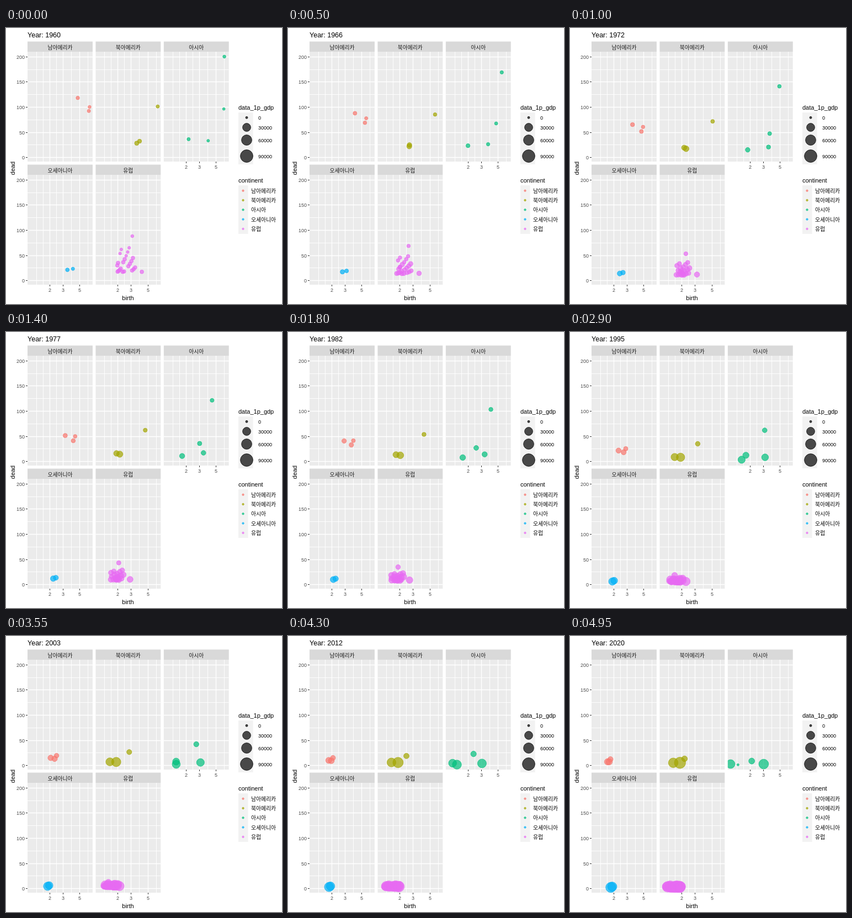
Recreate the animation shown at these times as an HTML page with a canvas. Size 500 by 500 pixels, loop 5 s.

```html
<!DOCTYPE html>
<html lang="ko">
<head>
<meta charset="utf-8">
<style>
html, body { margin: 0; width: 100%; height: 100%; overflow: hidden; background: #fff; }
canvas { display: block; width: 500px; height: 500px; }
</style>
</head>
<body>
<canvas id="stage" width="500" height="500"></canvas>
<script>
const ctx = document.getElementById('stage').getContext('2d');
const LOOP = 5000, STEP = 50, LAST = 99, YEARS = 60;
const SANS = '"Liberation Sans", Arial, sans-serif';
const HANGUL = '"Noto Sans CJK KR", "Noto Sans CJK", "Noto Sans CJK JP", sans-serif';
const PANEL_W = 117.9, PANEL_H = 199, STRIP_H = 18.5;

const lerp = (a, b, t) => a + (b - a) * t;

// Falls from 1 to 0 while t runs from 0 to 1; a higher pace falls earlier.
const decay = (t, pace) => (Math.exp(-pace * t) - Math.exp(-pace)) / (1 - Math.exp(-pace));

// birth, dead and size are [first year, last year]; pace is [birth, dead].
const country = (birth, dead, size, pace) => ({ birth, dead, size, pace });

const southAmerica = [
  country([4.7, 1.65], [118, 7], [3.2, 5.8], [.8, 3]),
  country([6.75, 1.8], [100, 12], [2.8, 4.8], [.5, 2.7]),
  country([6.6, 1.73], [92, 7], [3, 5.8], [.7, 3])
];
const northAmerica = [
  country([6.75, 2.16], [101, 13], [3, 5.2], [.5, 1.5]),
  country([3.87, 1.53], [32, 5], [3.7, 8.7], [5, 3]),
  country([3.55, 1.88], [28, 5], [3.9, 10.2], [6, 3])
];
const japan = country([2.16, 1.38], [36, 1], [3, 9], [1.5, 4.5]);
const asia = [
  country([6.45, 2.1], [200, 8.5], [2.8, 5.4], [.5, 1.2]),
  country([6.35, 1.1], [96, 2.5], [2.4, 7.9], [1.3, 3.5]),
  country([3.93, 3.03], [33, 2.5], [2.5, 8.8], [2.5, 2.3]),
  japan
];
const oceania = [
  country([3.42, 1.82], [21, 2], [3.4, 9.2], [4, 2]),
  country([4.05, 1.9], [23, 3.5], [3, 8.4], [4, 2])
];

// A cloud of countries spread evenly by index, plus two that stand apart.
const scatter = (i, step) => (i * step) % 1;
const europe = Array.from({ length: 22 }, (_, i) => {
  const dead = 17 + 50 * scatter(i + 1, .618) ** 2;
  return country(
    [1.95 + 1.5 * scatter(i + 1, .414) ** 1.5, lerp(1.22, 1.95, i / 21)],
    [dead, lerp(2, 4.5, scatter(i, .732))],
    [dead > 45 ? 2.6 : 3.4, lerp(6, 10.8, scatter(i, .382))],
    [2.5, 3]
  );
});
europe.push(
  country([3.1, 1.35], [88, 3], [2.8, 7], [2, 2.3]),
  country([4.15, 1.85], [17, 3], [3.4, 10.5], [1.5, 2])
);

const panel = (name, col, y, color, countries) => ({ name, x: 39 + 123.4 * col, y, color, countries });
const panels = [
  panel('남아메리카', 0, 43, '#F8766D', southAmerica),
  panel('북아메리카', 1, 43, '#A3A500', northAmerica),
  panel('아시아', 2, 43, '#00BF7D', asia),
  panel('오세아니아', 0, 266, '#00B0F6', oceania),
  panel('유럽', 1, 266, '#E76BF3', europe)
];

const birthX = (p, v) => p.x + 40.5 + 41 * Math.log2(v / 2);
const deadY = (p, v) => p.y + 191.25 - v * .912;
const gridX = (p, v) => Math.floor(birthX(p, v)) + .5;
const gridY = (p, v) => Math.round(deadY(p, v)) + .5;
const BIRTH_TICKS = [2, 3, 5];
const BIRTH_MINOR = [4 / 3, Math.sqrt(8 / 3), Math.sqrt(6), Math.sqrt(15), 5 * Math.sqrt(5 / 3)];

function rect(x, y, w, h, color) {
  ctx.fillStyle = color;
  ctx.fillRect(x, y, w, h);
}

function line(x1, y1, x2, y2, color, width) {
  ctx.strokeStyle = color;
  ctx.lineWidth = width;
  ctx.beginPath();
  ctx.moveTo(x1, y1);
  ctx.lineTo(x2, y2);
  ctx.stroke();
}

function text(s, x, y, size, color = '#000', align = 'left', family = SANS) {
  ctx.font = size + 'px ' + family;
  ctx.fillStyle = color;
  ctx.textAlign = align;
  ctx.fillText(s, x, y);
}

function dot(x, y, r, color) {
  ctx.globalAlpha = .7;
  ctx.fillStyle = ctx.strokeStyle = color;
  ctx.lineWidth = 1;
  ctx.beginPath();
  ctx.arc(x, y, r, 0, 2 * Math.PI);
  ctx.fill();
  ctx.stroke();
  ctx.globalAlpha = 1;
}

function drawPanel(p) {
  rect(p.x, p.y - STRIP_H, PANEL_W, STRIP_H, '#D9D9D9');
  rect(p.x, p.y, PANEL_W, PANEL_H, '#EBEBEB');
  text(p.name, p.x + PANEL_W / 2, p.y - 4.3, 9.8, '#1A1A1A', 'center', HANGUL);
  const vertical = (v, w) => line(gridX(p, v), p.y, gridX(p, v), p.y + PANEL_H, '#fff', w);
  const horizontal = (v, w) => line(p.x, gridY(p, v), p.x + PANEL_W, gridY(p, v), '#fff', w);
  for (const v of BIRTH_MINOR) vertical(v, .9);
  for (let v = 25; v < 200; v += 50) horizontal(v, .9);
  for (const v of BIRTH_TICKS) vertical(v, 1.3);
  for (let v = 0; v <= 200; v += 50) horizontal(v, 1.3);
}

function drawAxes() {
  for (const p of [panels[0], panels[3]])
    for (let v = 0; v <= 200; v += 50) {
      const y = gridY(p, v);
      line(36, y, 39, y, '#333', 1);
      text(v, 34, y + 3.3, 9, '#4D4D4D', 'right');
    }
  for (const p of panels.slice(2))
    for (const v of BIRTH_TICKS) {
      const x = gridX(p, v), y = p.y + PANEL_H;
      line(x, y, x, y + 3, '#333', 1);
      text(v, x, y + 13, 9, '#4D4D4D', 'center');
    }
  text('birth', 221, 492.5, 11, '#000', 'center');
  ctx.save();
  ctx.translate(16, 254);
  ctx.rotate(-Math.PI / 2);
  text('dead', 0, 0, 11, '#000', 'center');
  ctx.restore();
}

function drawLegends() {
  text('data_1p_gdp', 421, 148, 11);
  rect(421, 153, 26.5, 94, '#F2F2F2');
  for (const [label, y, r] of [[0, 162.3, 2], [30000, 180, 7.4], [60000, 203, 9.4], [90000, 232, 11.4]]) {
    dot(436, y, r, '#000');
    text(label, 457, y + 3.5, 9);
  }
  text('continent', 421, 280, 11);
  rect(421, 285, 17.5, 88, '#F2F2F2');
  panels.forEach((p, i) => {
    const y = 294.7 + i * 17.3;
    dot(429.5, y, 1.7, p.color);
    text(p.name, 444, y + 4, 9.8, '#000', 'left', HANGUL);
  });
}

function drawCountries(p, t) {
  ctx.save();
  ctx.beginPath();
  ctx.rect(p.x, p.y, PANEL_W, PANEL_H);
  ctx.clip();
  for (const c of p.countries) {
    const [birthPace, deadPace] = c.pace;
    const x = lerp(birthX(p, c.birth[1]), birthX(p, c.birth[0]), decay(t, birthPace));
    const y = deadY(p, lerp(c.dead[1], c.dead[0], decay(t, deadPace)));
    // Income is missing in the last year, so this dot shrinks at the end.
    const shrink = c === japan ? Math.max(0, t * YEARS - YEARS + 1) : 0;
    dot(x, y, lerp(lerp(c.size[0], c.size[1], t), 2, shrink), p.color);
  }
  ctx.restore();
}

function draw(now) {
  const t = Math.floor((now % LOOP) / STEP) / LAST;
  rect(0, 0, 500, 500, '#fff');
  text('Year: ' + (1960 + Math.round(t * YEARS)), 39, 17, 12.5);
  panels.forEach(drawPanel);
  drawAxes();
  drawLegends();
  for (const p of panels) drawCountries(p, t);
}

const start = performance.now();
function tick() {
  draw(performance.now() - start);
  requestAnimationFrame(tick);
}
tick();
</script>
</body>
</html>
```
